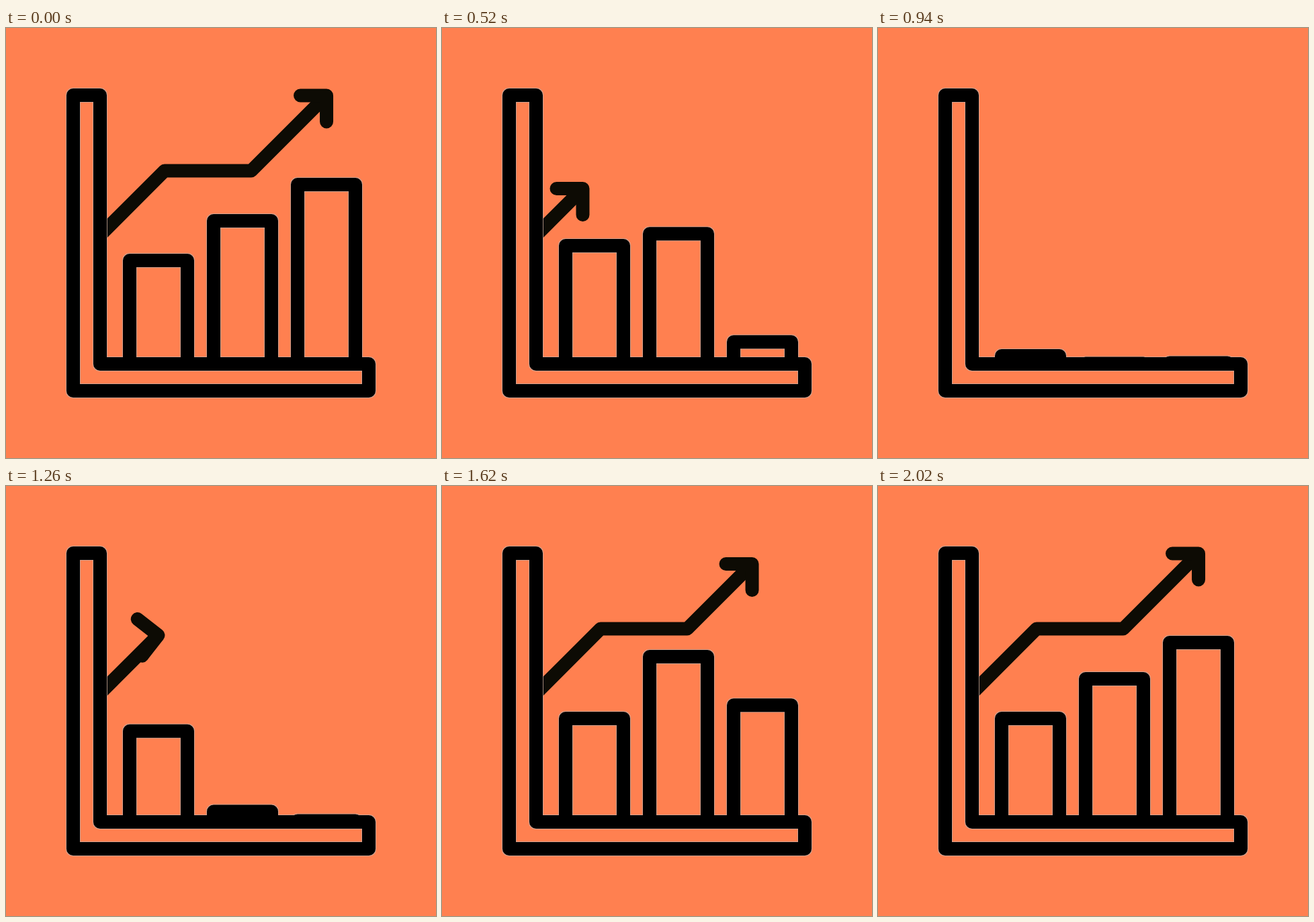
An HTML page for the animation above (2.22 s loop, 640 px wide and 640 px high).

```html
<!DOCTYPE html>
<html lang="en">
<head>
<meta charset="utf-8">
<title>Growth chart</title>
<style>
  html, body { margin: 0; width: 100%; height: 100%; overflow: hidden; background: #ff8050; }
  svg { display: block; width: 100vw; height: 100vh; }
  path { fill: none; stroke: #000; stroke-width: 20; stroke-linejoin: round; }
  .arrow path { stroke: #0d0b04; }
  .chart { filter: url(#rim); }
  #head { stroke-linecap: round; }
</style>
</head>
<body>
<svg viewBox="0 0 640 640">
  <clipPath id="plot"><rect x="150.5" width="490" height="500"/></clipPath>
  <!-- thin pale rim around the black outlines -->
  <filter id="rim" filterUnits="userSpaceOnUse" x="0" y="0" width="640" height="640" color-interpolation-filters="sRGB">
    <feMorphology in="SourceAlpha" operator="dilate" radius="1" result="wide"/>
    <feFlood flood-color="#b4b4b4" flood-opacity=".6"/>
    <feComposite in2="wide" operator="in" result="edge"/>
    <feMerge><feMergeNode in="edge"/><feMergeNode in="SourceGraphic"/></feMerge>
  </filter>
  <g class="arrow" clip-path="url(#plot)">
    <path id="shaft" d="M133.8 314.7 L236 212.5 H365 L491 86.5"/>
    <path id="head" d="M-39 0 H0 V39"/>
  </g>
  <g class="chart">
    <g clip-path="url(#plot)">
      <path class="bar" d="M434 560 V233 H520 V560"/>
      <path class="bar" d="M309 560 V287 H395 V560"/>
      <path class="bar" d="M184 560 V346 H270 V560"/>
    </g>
    <path d="M100 100 H140 V500 H540 V540 H100 Z"/>
  </g>
</svg>
<script>
  const LOOP = 2220, STEP = 20;
  const REACH = 432, OVERSHOOT = 18.5, LIFT = -34;
  const shaft = document.getElementById('shaft');
  const head = document.getElementById('head');
  const bars = [...document.querySelectorAll('.bar')];
  const drops = [265.5, 212.5, 153.5];

  // Eased value at time t from [time, value] keys.
  function ease(t, keys) {
    const i = keys.findIndex(k => k[0] > t);
    if (i === 0) return keys[0][1];
    if (i < 0) return keys[keys.length - 1][1];
    const [t0, a] = keys[i - 1], [t1, b] = keys[i];
    const x = (t - t0) / (t1 - t0);
    return a + (b - a) * x * x * (3 - 2 * x);
  }

  // Each bar lifts, drops below the axis, then mirrors that on the way back.
  const barKeys = drops.map((drop, i) => {
    const d = i * 200;
    return [[d, 0], [d + 200, LIFT], [d + 600, drop],
            [1400 - d, drop], [1800 - d, LIFT], [2000 - d, 0]];
  });
  const reachKeys = [[0, REACH], [770, 0], [980, 0], [1765, REACH + OVERSHOOT], [2000, REACH]];
  const turnKeys = [[240, 0], [320, 45], [400, 45], [480, 0],
                    [1200, 0], [1280, 45], [1360, 45], [1440, 0]];

  function draw(t) {
    bars.forEach((bar, i) => bar.setAttribute('transform', `translate(0 ${ease(t, barKeys[i])})`));
    const reach = ease(t, reachKeys);
    const tip = shaft.getPointAtLength(reach);
    shaft.setAttribute('stroke-dasharray', `${reach} 999`);
    head.setAttribute('transform', `translate(${tip.x} ${tip.y}) rotate(${ease(t, turnKeys)})`);
  }

  const start = performance.now();
  function tick() {
    const t = (performance.now() - start) % LOOP;
    draw(Math.floor(t / STEP) * STEP);
    requestAnimationFrame(tick);
  }
  tick();
</script>
</body>
</html>
```
